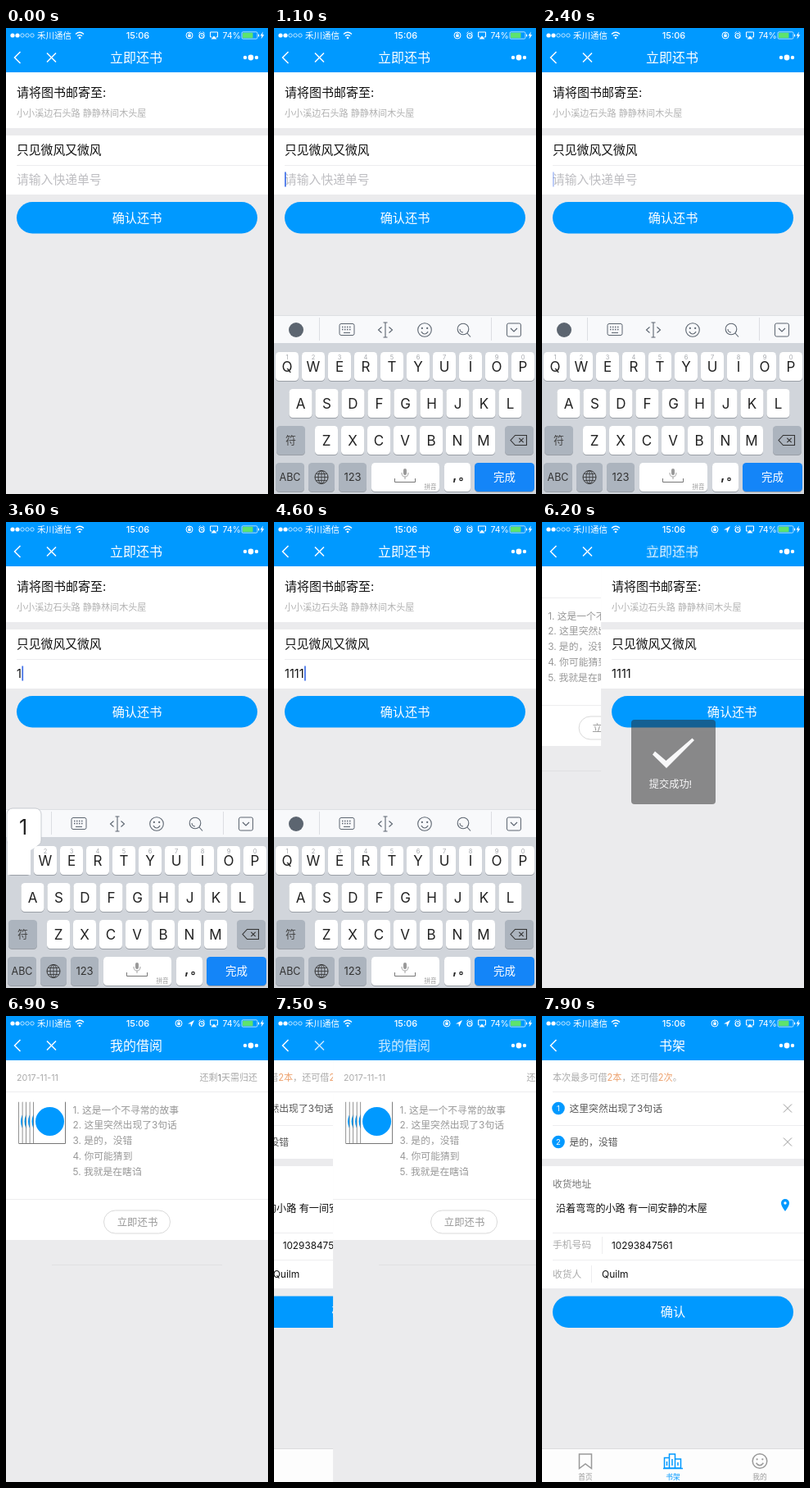
Write an HTML page that moves like this. It is 320 px wide and 568 px high and loops after 8000 ms.

```html
<!DOCTYPE html>
<html lang="zh-CN">
<head>
<meta charset="utf-8">
<title>还书</title>
<style>
html, body { margin: 0; width: 100%; height: 100%; overflow: hidden; background: #ebebed; }
svg { display: block; width: 100%; height: 100%; }
text { font-family: Inter, "Noto Sans CJK SC", "Noto Sans CJK", sans-serif; white-space: pre; }
</style>
</head>
<body>
<svg id="stage" viewBox="0 0 320 568"></svg>
<script>
const BLUE = '#0099ff', GRAY = '#ebebed', RULE = '#ededef', SLATE = '#5c6570';
const LOOP = 8000;

// Markup helpers
const text = (x, y, s, size, fill, extra = '') =>
  `<text x="${x}" y="${y}" font-size="${size}" fill="${fill}" ${extra}>${s}</text>`;
const mid = (x, y, s, size, fill, extra = '') => text(x, y, s, size, fill, 'text-anchor="middle" ' + extra);
const rect = (x, y, w, h, fill, r = 0, extra = '') =>
  `<rect x="${x}" y="${y}" width="${w}" height="${h}" rx="${r}" fill="${fill}" ${extra}/>`;
const dot = (x, y, r, fill, extra = '') => `<circle cx="${x}" cy="${y}" r="${r}" fill="${fill}" ${extra}/>`;
const line = (d, color, w = 1, extra = '') =>
  `<path d="${d}" fill="none" stroke="${color}" stroke-width="${w}" ${extra}/>`;
const ring = (x, y, r, color, w = 1) => dot(x, y, r, 'none', `stroke="${color}" stroke-width="${w}"`);
const rule = (y, x = 13) => rect(x, y, 320 - x, 1, RULE);
const cross = (x, y, r, color, w) => line(`M${x - r} ${y - r}l${2 * r} ${2 * r}m0 ${-2 * r}l${-2 * r} ${2 * r}`, color, w);
const group = (id, body) => `<g id="${id}">${body}</g>`;
const each = (list, fn) => [...list].map(fn).join('');
const pill = (y, label) => rect(13, y, 294, 38.5, BLUE, 19.25) + mid(160, y + 24.8, label, 15.2, '#fff');
const face = (x, y, r, color, w) => ring(x, y, r, color, w) +
  dot(x - r * .38, y - r * .25, 1.1, color) + dot(x + r * .38, y - r * .25, 1.1, color) +
  line(`M${x - r * .5} ${y + r * .25}q${r * .5} ${r * .7} ${r} 0`, color, w);

function statusBar() {
  const icons = dx => ring(224 + dx, 9, 4, '#fff') + rect(222.3 + dx, 8, 3.4, 3, '#fff') + line(`M${223 + dx} 8v-1.5h2v1.5`, '#fff', .7);
  return each([8, 14, 20, 26, 32], (x, i) => i < 2 ? dot(x, 9, 2.6, '#fff') : ring(x, 9, 2.2, '#fff', .7)) +
    text(38, 13, '禾川通信', 10.5, '#fff') +
    line('M85 7.5q5 -4.5 10 0M87 9.8q3 -2.6 6 0', '#fff', 1.4) + dot(90, 12, 1.3, '#fff') +
    mid(161, 13, '15:06', 11, '#fff', 'font-weight="500"') +
    group('lock', icons(0)) +
    group('arrow', '<path d="M222 9.5l8 -4.500l-4 8.500l-.4 -4z" fill="#fff"/>') +
    ring(239, 9.5, 3, '#fff', 1.2) + line('M235.500 6.500l2 -2M242.500 6.500l-2 -2M239 7.800v2h1.500', '#fff', 1) +
    line('M251.500 11h-2v-6h9v6h-2', '#fff', 1) + '<path d="M250.500 13.500l3.500 -4l3.500 4z" fill="#fff"/>' +
    text(264.5, 13, '74%', 10.5, '#fff') +
    rect(288, 4.8, 19, 8.4, 'none', 1.5, 'stroke="#fff" stroke-width=".7"') + rect(289, 5.8, 12.5, 6.4, '#5ee36e', .8) +
    rect(308, 7.5, 1.2, 3, '#fff', .6) + '<path d="M314 4.500l-3.500 5h2l-1 4l3.800 -5.300h-2.200z" fill="#fff"/>';
}

const title = (id, s) => mid(159, 41.8, s, 16, '#fff', `id="${id}" font-weight="500"`);
const navBar = () => rect(0, 0, 320, 54, BLUE) + statusBar() +
  line('M17.500 29l-7 7l7 7', '#fff', 1.5) + group('close', cross(55.5, 36, 5.5, '#fff', 1.5)) +
  title('returnTitle', '立即还书') + title('borrowTitle', '我的借阅') + title('shelfTitle', '书架') +
  dot(292, 36, 2.2, '#fff') + dot(299, 36, 3.4, '#fff') + dot(306, 36, 2.2, '#fff');

const returnPage = () => rect(0, 54, 320, 514, GRAY) +
  rect(0, 54, 320, 68, '#fff') + text(13, 84, '请将图书邮寄至:', 15, '#111') +
  text(13, 107.5, '小小溪边石头路 静静林间木头屋', 11.1, '#b2b2b2') +
  rect(0, 131, 320, 72, '#fff') + text(13, 154.3, '只见微风又微风', 14.8, '#111') + rule(167) +
  text(13, 190.3, '请输入快递单号', 14.8, '#bebec2', 'id="hint"') +
  text(13, 190.3, '', 14.5, '#111', 'id="value"') +
  rect(13, 175.5, 1.7, 18, '#3f6fe8', 0, 'id="caret"') +
  pill(212, '确认还书');

function key(x, y, w, label, fill = '#fff', size = 17, color = '#222') {
  return rect(x, y + 1, w, 35, '#9a9fa6', 4.5) + rect(x, y, w, 35, fill, 4.5) +
    mid(x + w / 2, y + 17.5 + size * .36, label, size, color);
}
function keyboard() {
  const DARK = '#acb4be';
  const row = (letters, x, y) => each(letters, (c, i) => key(x + i * 32, y, 28, c));
  return rect(0, 350, 320, 34, '#f8f9fb') + rect(0, 350, 320, 1, '#dddfe3') + rect(0, 384, 320, 184, '#d1d5db') +
    dot(27, 368, 9, SLATE) + rect(55, 353, 1, 28, '#dcdee2') + rect(265, 353, 1, 28, '#dcdee2') +
    rect(80, 360.5, 18, 14, 'none', 2, `stroke="${SLATE}"`) +
    line('M83 364.500h12M83 367.500h12', SLATE, 1.5, 'stroke-dasharray="1.5 1.5"') + line('M85 371.500h8', SLATE) +
    line('M136 359v18M133.500 359h5M133.500 377h5M131.500 364.500l-4 3.500l4 3.500M140.500 364.500l4 3.500l-4 3.500', SLATE, 1.1) +
    face(184, 368, 8.3, SLATE, 1.1) + ring(231, 367, 6.8, SLATE, 1.1) + line('M236 372l4 4.500M227 367a4 4 0 0 0 4 4', SLATE, 1.1) +
    rect(284.5, 360, 17, 16, 'none', 2, `stroke="${SLATE}"`) + line('M289 366l4 4l4 -4', SLATE, 1.2) +
    row('QWERTYUIOP', 2, 395) + each('1234567890', (n, i) => mid(16 + i * 32, 403.5, n, 7.5, '#a5a8ad')) +
    row('ASDFGHJKL', 18.5, 440) + row('ZXCVBNM', 50, 485) +
    key(3, 485, 35, '符', DARK, 13, '#444') + key(282, 485, 35, '', DARK) +
    line('M294.500 496.500h14v12h-14l-5.500 -6z', '#333', 1.1) + cross(302, 502.5, 2.7, '#333', 1.1) +
    key(2, 530, 35, 'ABC', DARK, 12.5, '#333') + key(42, 530, 32, '', DARK) +
    ring(58, 547.5, 8, '#333') + line('M50 547.500h16M58 539.500v16M51.500 543.500h13M51.500 551.500h13', '#333', .8) +
    '<ellipse cx="58" cy="547.5" rx="4" ry="8" fill="none" stroke="#333" stroke-width=".9"/>' +
    key(79, 530, 34, '123', DARK, 13, '#333') + key(119, 530, 83, '') +
    rect(158, 537, 4, 8, '#999', 2) + line('M156 542q0 5 4 5t4 -5M160 547v3', '#999', .9) +
    line('M147.500 549v4.500h25v-4.500', '#777') + mid(191, 561.5, '拼音', 7.5, '#999') +
    key(208, 530, 32, '') + text(218, 551, ',', 17, '#222', 'font-weight="600"') + ring(228.5, 550, 1.7, '#222', 1.2) +
    key(245, 530, 73, '完成', '#1485f8', 13.5, '#fff') +
    group('bubble', rect(1, 349, 42, 46, '#fff', 7, 'stroke="#b4b8bf" stroke-width=".7"') +
      '<path d="M2 388h40q-2 7 -12 12v30H2z" fill="#fff"/>' + mid(21, 381, '1', 25, '#222'));
}

const toast = () => rect(109, 241, 103, 103, 'rgba(40,40,40,.73)', 4) +
  '<path d="M138 279.500l13.500 11.500l32 -27.500l2.500 2.500l-34 34l-17 -16.500z" fill="#fff"/>' +
  mid(157, 324, '提交成功!', 12.2, '#fff');

const book = x => rect(x - .8, 104.5, 39.8, 51.5, '#777', 1) + rect(x, 104, 38, 51, '#fff') + dot(x + 19.5, 128.5, 17.5, BLUE);
const borrowPage = () => rect(0, 54, 320, 514, GRAY) + rect(0, 54, 320, 219, '#fff') +
  text(13, 79.3, '2017-11-11', 10.7, '#aaa') +
  text(307, 79.3, '还剩<tspan fill="#888">1</tspan>天需归还', 11, '#aaa', 'text-anchor="end"') + rule(92, 0) +
  each([16, 20.5, 25, 29.5, 34], book) +
  each(['这是一个不寻常的故事', '这里突然出现了3句话', '是的，没错', '你可能猜到', '我就是在瞎诌'],
    (s, i) => text(81.5, 118.5 + i * 18.8, `${i + 1}. ${s}`, 11.8, '#999')) +
  rule(223, 0) + rect(119.5, 237, 81, 28, '#fff', 14, 'stroke="#d0d0d0" stroke-width=".8"') +
  mid(160.5, 255.6, '立即还书', 12.4, '#999') + rect(56, 303, 208, 1, '#e0e0e2');

const pickedBook = (n, y, s) => dot(20, y, 7.8, BLUE) + mid(20, y + 3.4, n, 9.5, '#fff') +
  text(33.5, y + 4.6, s, 11.8, '#555') + cross(300, y, 5, '#999', 1);
const tab = (x, label, color) => mid(x, 565.3, label, 8.7, color);
const shelfPage = () => rect(0, 54, 320, 514, GRAY) + rect(0, 54, 320, 120, '#fff') +
  text(13, 79.3, '本次最多可借<tspan fill="#eda06c">2本</tspan>，还可借<tspan fill="#eda06c">2次</tspan>。', 11.1, '#aaa') +
  rule(92) + pickedBook(1, 112.5, '这里突然出现了3句话') + rule(133) + pickedBook(2, 153.5, '是的，没错') +
  rect(0, 183, 320, 149, '#fff') + text(13, 208.6, '收货地址', 11.8, '#777') +
  text(17, 238.5, '沿着弯弯的小路 有一间安静的木屋', 12.1, '#111') +
  `<path d="M297 238q-5 -6.500 -5 -10a5 5 0 0 1 10 0q0 3.500 -5 10z" fill="${BLUE}"/>` + dot(297, 228, 1.7, '#fff') +
  rule(264) + text(13, 283.3, '手机号码', 11.8, '#aaa') + rect(73, 269, 1, 21, RULE) + text(85, 283.5, '10293847561', 11.8, '#111') +
  rule(297) + text(13, 319.3, '收货人', 11.8, '#aaa') + rect(60, 304, 1, 21, RULE) + text(73, 319.3, 'Quilm', 12, '#111') +
  pill(341.5, '确认') +
  rect(0, 527, 320, 41, '#fdfdfd') + rect(0, 527, 320, 1, '#dcdcde') +
  line('M45.500 534h15v17.500l-7.500 -5.500l-7.500 5.500z', '#999', 1.5) + tab(53, '首页', '#999') +
  line('M149.500 538.500h6v12.500h-6zM155.500 534h7v17h-7zM162.500 540h7v11h-7zM148 551.500h24', BLUE, 1.5) +
  line('M152.500 543v5M159 540v8M166 544v4', BLUE, 1.5) + tab(160, '书架', BLUE) +
  face(266, 542.5, 8.8, '#999', 1.5) + tab(266, '我的', '#999');

const stage = document.getElementById('stage');
stage.innerHTML = group('shelf', shelfPage()) + group('borrow', borrowPage()) + group('return', returnPage()) +
  group('keyboard', keyboard()) + group('toast', toast()) + navBar();
const el = {};
stage.querySelectorAll('[id]').forEach(node => el[node.id] = node);

// Motion
const ramp = (t, start, length) => Math.min(1, Math.max(0, (t - start) / length));
const easeOut = p => 1 - (1 - p) ** 3;
const smooth = p => p * p * (3 - 2 * p);
const show = (node, on) => node.style.display = on ? '' : 'none';
const fade = (node, opacity) => node.setAttribute('opacity', opacity);
const move = (node, x, y) => node.setAttribute('transform', `translate(${x} ${y})`);

const PRESSES = [[2480, 2750], [3500, 3690], [3880, 4090], [4400, 4590]];

function caretOpacity(t) {
  if (t < 800 || t >= 5000) return 0;
  if (t < 1000 || t >= 2480) return 1;
  const phase = (t - 960) % 700;
  return ramp(phase, 0, 100) - ramp(phase, 340, 100);
}

function draw(t) {
  const popReturn = easeOut(ramp(t, 6170, 380)), popBorrow = easeOut(ramp(t, 7470, 380));
  move(el.return, 320 * popReturn, 0);
  move(el.borrow, popBorrow ? 320 * popBorrow : -96 * (1 - popReturn), 0);
  move(el.shelf, -96 * (1 - popBorrow), 0);
  show(el.return, popReturn < 1);
  show(el.borrow, popReturn > 0 && popBorrow < 1);
  show(el.shelf, popBorrow > 0);
  fade(el.returnTitle, 1 - popReturn);
  fade(el.borrowTitle, popReturn * (1 - popBorrow));
  fade(el.shelfTitle, popBorrow);
  fade(el.close, 1 - popBorrow);

  const raised = easeOut(ramp(t, 770, 300)) - smooth(ramp(t, 5000, 375));
  move(el.keyboard, 0, 218 * (1 - raised));
  show(el.keyboard, raised > 0);
  show(el.bubble, PRESSES.some(([down, up]) => t >= down && t < up));

  const typed = PRESSES.filter(([, up]) => t >= up).length;
  el.value.textContent = '1'.repeat(typed);
  show(el.hint, !typed);
  fade(el.caret, caretOpacity(t));
  move(el.caret, typed ? el.value.getComputedTextLength() + .5 : 0, 0);

  fade(el.toast, ramp(t, 5150, 150) * (1 - ramp(t, 6170, 100)));
  const located = t >= 5000;
  show(el.arrow, located);
  move(el.lock, located ? -13 : 0, 0);
}

function frame() {
  draw(performance.now() % LOOP);
  requestAnimationFrame(frame);
}
frame();
</script>
</body>
</html>
```
